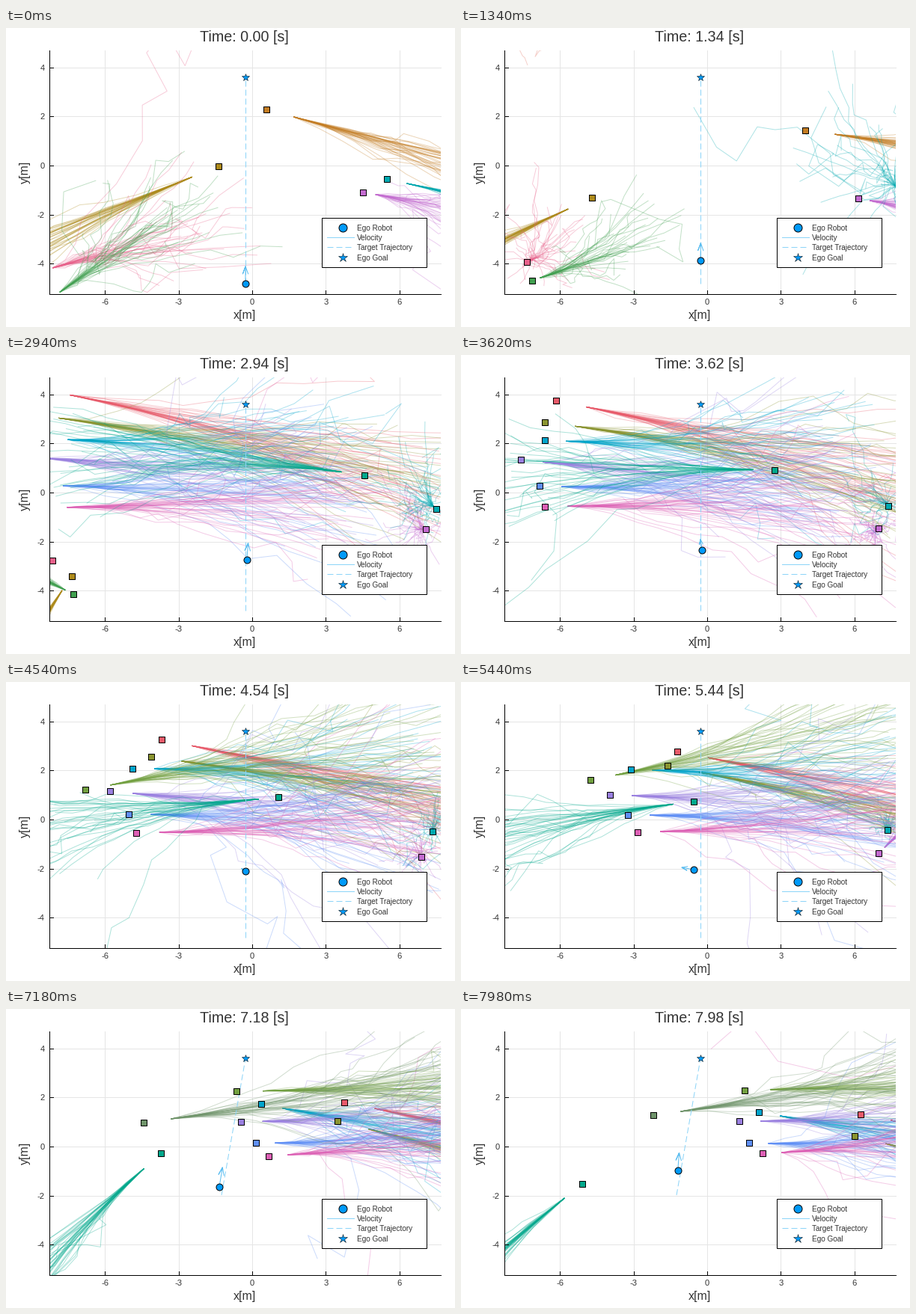
A matplotlib script for the animation above (8000 ms loop, 600 by 400 pixels).

```python
import numpy as np
import matplotlib.pyplot as plt
from matplotlib.animation import FuncAnimation
from matplotlib.collections import LineCollection
from matplotlib.colors import to_rgba
from matplotlib.patches import Rectangle

FRAMES, STEP_MS = 400, 20
LEFT, RIGHT, TOP, BOTTOM = 58, 581, 30, 356
PX = 0.72                      # points per pixel at 100 dpi
TICK_FRAMES = 20               # pedestrians are observed every 0.4 s
SAMPLES, HORIZON = 36, 12
REPLAN = 6.54
BLUE, SKY, ARROW, INK = "#009afa", "#8cd4f8", "#5bbdf0", "#333333"


def glide(times, pts, t):
    """Smooth path through timed points, straight beyond both ends."""
    vel = np.gradient(pts, times, axis=0)
    if t < times[0]:
        return pts[0] + vel[0] * (t - times[0])
    if t > times[-1]:
        return pts[-1] + vel[-1] * (t - times[-1])
    i = min(np.searchsorted(times, t, side="right") - 1, len(times) - 2)
    h = times[i + 1] - times[i]
    s = (t - times[i]) / h
    return (pts[i] * (1 + 2 * s) * (1 - s) ** 2 + pts[i + 1] * s * s * (3 - 2 * s)
            + h * s * (1 - s) * ((1 - s) * vel[i] - s * vel[i + 1]))


class Walker:
    """Seen from one observation tick to another; path holds (tick, x, y)."""

    def __init__(self, color, seen, path, spread=50, calm=None, bend=0.0):
        path = np.array(path, float)
        self.color, self.seen, self.bend = to_rgba(color), seen, bend
        self.times, self.pts = path[:, 0], path[:, 1:]
        self.spread, self.calm = spread, calm or spread

    def at(self, tick):
        return glide(self.times, self.pts, tick)

    def fan(self, tick, rng):
        """Sampled futures: gently turning mean, drift and jagged jitter."""
        k = np.arange(HORIZON + 1)
        u = (k / HORIZON)[:, None]
        start = self.at(tick + 1)
        dx, dy = start - self.at(tick)
        turn = self.bend * k / HORIZON / 2
        c, s = np.cos(turn), np.sin(turn)
        mean = start + k[:, None] * np.column_stack([dx * c - dy * s, dx * s + dy * c])

        age = (tick - self.seen[0]) / max(self.seen[1] - self.seen[0], 1)
        spread = self.spread * (self.calm / self.spread) ** age
        drift = rng.normal(size=(SAMPLES, 1, 2)) * u ** 1.8
        wild = rng.exponential(size=(SAMPLES, 1, 1))
        jitter = rng.normal(0, 0.17, (SAMPLES, HORIZON + 1, 2)).cumsum(axis=1)
        return mean + spread * (0.85 * drift + wild * jitter * u)


crowd = []


def walk(*args, **kw):
    crowd.append(Walker(*args, **kw))


# people on the stage at the beginning
walk("#c47d23", (0, 6), [(0, 347.5, 109), (3, 459.5, 137), (5, 540.5, 146.5)], bend=0.15)
walk("#ad8a1a", (0, 7), [(0, 284, 185), (5, 117.5, 258.5), (8, 75, 315)], 38, bend=-0.12)
walk("#c36bd0", (0, 15), [(0, 476.5, 220), (5, 556.5, 232.5), (9, 558, 232.5),
                          (13, 558, 229.5), (16, 588, 200)], 60, 15, bend=0.3)
walk("#00a9b0", (0, 2), [(0, 508.5, 202.5), (3, 590, 219)], 20, bend=0.2)
walk("#00a9b0", (3, 15), [(3, 586, 216), (9, 571, 202), (13, 570, 198)], 80, 10)
walk("#e8608a", (0, 7), [(0, 47, 325), (3, 88, 313), (5, 88, 307), (7, 62, 275)], 38)
walk("#41a050", (0, 7), [(0, 60, 362), (3, 94.5, 338), (5, 111.5, 331), (7, 90, 320)], 42)
walk("#e06a58", (1, 6), [(1, 50, 16), (6, 50, 4)], 48, 30)
# group coming in from the left
walk("#e85a6a", (7, 20), [(9, 126.5, 61.5), (19, 533.5, 141)], bend=0.12)
walk("#8a9430", (7, 20), [(9, 111.5, 90), (13, 276, 112.5), (19, 526, 170.5)], bend=0.12)
walk("#00a5cc", (7, 20), [(9, 111.5, 114.5), (16, 313, 123), (19, 398, 138)])
walk("#9a80e0", (7, 20), [(9, 79.5, 140.5), (13, 199, 151), (19, 371.5, 150)], 58)
walk("#5f8ff5", (7, 20), [(9, 105, 175.5), (16, 308, 179), (19, 385, 179.5)])
walk("#dd60b5", (7, 20), [(9, 112, 203), (16, 324, 198), (19, 402.5, 193.5)], bend=-0.05)
# one going left, two late followers
walk("#00a88c", (4, 20), [(5, 541, 170.5), (9, 419, 154), (13, 311, 160),
                          (16, 231, 177), (19, 161.5, 234)], 42, bend=-0.12)
walk("#72a040", (10, 20), [(13, 173, 131.5), (16, 273, 112.5), (19, 378.5, 109)])
walk("#6f946a", (14, 20), [(16, 147, 157), (19, 257, 142)], 55)

EGO_TIMES = np.array([0, 1.34, 2.28, 3.62, 5.44, 6.4, 6.6, 7.98])
EGO = np.array([(320, 342), (320, 311), (320.7, 289), (322, 261),
                (311, 251), (290.7, 249.5), (287.2, 248.5), (289.7, 216)])

fig = plt.figure(figsize=(6, 4), dpi=100, facecolor="white")
ax = fig.add_axes([LEFT / 600, 1 - BOTTOM / 400, (RIGHT - LEFT) / 600, (BOTTOM - TOP) / 400])
ax.set(xlim=(LEFT, RIGHT), ylim=(BOTTOM, TOP))
ax.set_axis_off()


def line(x, y, color, z, **kw):
    return ax.plot(x, y, color=color, lw=PX, zorder=z, clip_on=False, **kw)[0]


def mark(x, y, shape, size, z, edge=1.0):
    return ax.plot([x], [y], shape, ms=size * PX, mfc=BLUE, mec="black", mew=edge * PX,
                   zorder=z, clip_on=False, snap=False)[0]


def label(x, y, s, size, ha="center", va="baseline", **kw):
    return ax.text(x, y, s, fontsize=size, family="Liberation Sans", color=INK,
                   ha=ha, va=va, zorder=12, **kw)


# grid, ticks and axes
for v in (-6, -3, 0, 3, 6):
    x = 329 + 32.77 * v
    line([x, x], [TOP, BOTTOM], "#e5e5e5", 1)
    line([x, x], [BOTTOM, BOTTOM - 5], "black", 6)
    label(x, 370, str(v), 8)
for v in (-4, -2, 0, 2, 4):
    y = 184 - 32.77 * v
    line([LEFT, RIGHT], [y, y], "#e5e5e5", 1)
    line([LEFT, LEFT + 5], [y, y], "black", 6)
    label(51.5, y + 4, str(v), 8, ha="right")
line([LEFT, LEFT], [TOP, BOTTOM + .5], "black", 6)
line([LEFT, RIGHT], [BOTTOM + .5, BOTTOM + .5], "black", 6)
label(318.5, 389, "x[m]", 11.5)
label(25, 193, "y[m]", 11.5, va="center", rotation=90)
title = label(318.5, 18.5, "", 14.2)

# legend
DASH = (0, (8, 4))
ax.add_patch(Rectangle((422, 254.5), 140, 66, fc="white", ec="black", lw=PX, zorder=10))
names = "Ego Robot", "Velocity", "Target Trajectory", "Ego Goal"
for y, name in zip((267.5, 280.5, 293.5, 307.5), names):
    label(469, y + 3.5, name, 7.2, ha="left")
mark(449.5, 267.5, "o", 11, 11)
line([429, 465], [280.5, 280.5], SKY, 11)
line([429, 465], [293.5, 293.5], SKY, 11, ls=DASH)
mark(449.5, 307.5, "*", 12.5, 11, 0.5)

# moving parts
fans = LineCollection([], linewidths=PX, zorder=2)
ax.add_collection(fans, autolim=False)
squares = ax.scatter([], [], s=(8 * PX) ** 2, marker="s", edgecolors="black",
                     linewidths=PX, zorder=5)
plan = line([], [], SKY, 3, ls=DASH)
arrow = line([], [], ARROW, 7)
goal = mark(320.3, 66.5, "*", 11, 8, 0.5)
ego = mark(0, 0, "o", 9, 8)


def draw_crowd(tick):
    rng = np.random.default_rng(100 + tick)
    paths, tints, spots, fills = [], [], [], []
    for w in crowd:
        if w.seen[0] <= tick <= w.seen[1]:
            paths.extend(w.fan(tick, rng))
            tints.extend([w.color[:3] + (0.32,)] * SAMPLES)
            spots.append(w.at(tick))
            fills.append(w.color)
    fans.set_segments(paths)
    fans.set_color(tints)
    squares.set_offsets(spots)
    squares.set_facecolor(fills)


def draw_ego(t):
    where = lambda s: glide(EGO_TIMES, EGO, s)
    pos = where(t)
    vel = (where(t + 0.01) - where(t - 0.01)) / 0.02
    speed = np.hypot(*vel)
    d = vel / max(speed, 1e-6)
    n = np.array([-d[1], d[0]])
    barb, tip = min(10, speed * 0.45), pos + vel
    pts = np.array([pos, tip, tip - barb * (d + 0.36 * n), tip,
                    tip - barb * (d - 0.36 * n)])
    arrow.set_data(pts[:, 0], pts[:, 1])
    ego.set_data([pos[0]], [pos[1]])
    begin = (320, 342) if t < REPLAN else (288, 249)
    plan.set_data([begin[0], 320], [begin[1], 66.5])


def draw(frame):
    t = frame * STEP_MS / 1000
    title.set_text(f"Time: {t:.2f} [s]")
    draw_crowd(frame // TICK_FRAMES)
    draw_ego(t)
    return fans, squares, plan, arrow, ego, title


anim = FuncAnimation(fig, draw, frames=FRAMES, interval=STEP_MS,
                     repeat=True, repeat_delay=0, blit=False)
plt.show()
```
